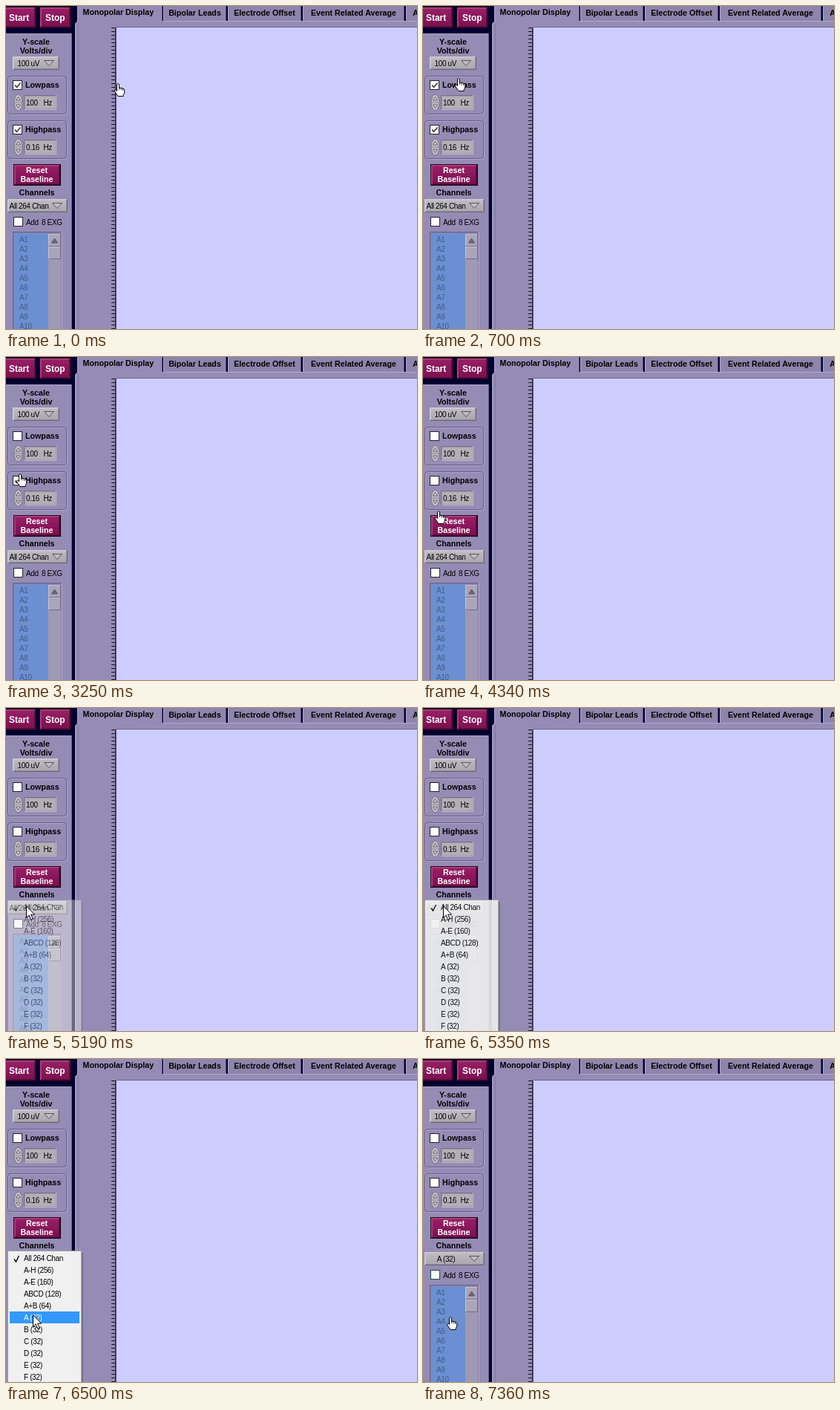
Write an HTML page that moves like this. It is 554 px wide and 435 px high and loops after 8520 ms.

```html
<!DOCTYPE html>
<html lang="en">
<head>
<meta charset="utf-8">
<title>Channel display settings</title>
<style>
  html, body { margin: 0; width: 100%; height: 100%; overflow: hidden; background: #000030; }
  svg { display: block; width: 554px; height: 435px; font: 10px "Liberation Sans", Arial, sans-serif; letter-spacing: -.37px; fill: #000; }
  .b { font-weight: bold; font-size: 10.7px; letter-spacing: 0; }
  .big { font-size: 11.9px; }
  .w { fill: #fff; }
  .m { text-anchor: middle; }
  .line { fill: none; }
</style>
</head>
<body>
<svg id="stage" viewBox="0 0 554 435" xmlns="http://www.w3.org/2000/svg"></svg>
<script>
const LOOP = 8520;
const PANEL = '#958cb5', LIGHT = '#b0a9cc', DARK = '#655d86';

const rect = (x, y, w, h, fill, more = '') =>
  `<rect x="${x}" y="${y}" width="${w}" height="${h}" fill="${fill}" ${more}/>`;
const path = (d, stroke, fill = 'none', more = '') =>
  `<path d="${d}" stroke="${stroke}" fill="${fill}" ${more}/>`;
const text = (x, y, s, cls = '', more = '') =>
  `<text x="${x}" y="${y}" class="${cls}" ${more}>${s}</text>`;
const bevel = (x, y, w, h, fill, hi, lo) => rect(x, y, w, h, fill) +
  path(`M${x + .5} ${y + h}V${y + .5}H${x + w}`, hi) +
  path(`M${x + .5} ${y + h - .5}H${x + w - .5}V${y}`, lo);

const button = (x, y, w, h) =>
  rect(x, y, w, h, '#1c0618') +
  bevel(x + 1, y + 1, w - 2, h - 2, '#8a1858', '#b5447f', '#4a0832') +
  bevel(x + 2, y + 2, w - 4, h - 4, 'url(#wine)', '#a8336f', '#5c0d40');

const dropdown = (x, y, w) =>
  bevel(x, y, w, 18, '#b5b3b9', '#cfcdd3', '#6b6777') +
  bevel(x + 1, y + 1, w - 2, 16, 'url(#steel)', '#c6c4ca', '#918d9a') +
  path(`M${x + w - 20.5} ${y + 5.5}h13l-6.5 7z`, '#55525c', '#c0bec4');

const group = y =>
  `<rect x="3.5" y="${y + 1.5}" width="79" height="51" rx="4" class="line" stroke="${LIGHT}"/>` +
  `<rect x="2.5" y="${y + .5}" width="79" height="51" rx="4" class="line" stroke="${DARK}"/>`;

const spinner = (y, value) =>
  `<ellipse cx="16.5" cy="${y}" rx="5.5" ry="11" fill="#c2bfc7" stroke="#77727f"/>` +
  path(`M11.5 ${y}h10`, '#85808e') +
  path(`M13.5 ${y - 3}l3-4.5 3 4.5z M13.5 ${y + 3}l3 4.5 3-4.5z`, '#444', '#d6d4da', 'stroke-width=".8"') +
  bevel(24, y - 10, 44, 20, '#a19daa', '#746d8a', '#bdb8cd') +
  rect(26, y - 8, 40, 16, '#b2b0b5') +
  text(27, y + 4, value) + text(50.5, y + 4, 'Hz');

const checkbox = (id, x, y) =>
  rect(x + .5, y + .5, 12, 12, '#fff', `id="${id}" stroke="#24222c"`) +
  path(`M${x + 3} ${y + 6.5}l2.5 3 5-6`, '#222', 'none', `id="${id}Tick" stroke-width="1.3"`);

const tab = (x, w, label) =>
  rect(x, 0, w, 20, '#8d85ab') +
  path(`M${x + .5} 19V0`, LIGHT) + path(`M${x + w - .5} 0V19`, '#4f4870') +
  text(x + w / 2, 13, label, 'b m');

function sidebar() {
  return rect(0, 0, 89, 37, '#000030') +
    button(-6, 1, 47, 29) + button(45, 1, 43, 29) +
    text(4, 20, 'Start', 'b w big') + text(53, 20, 'Stop', 'b w big') +
    bevel(-2, 37, 91, 400, PANEL, LIGHT, DARK) +
    text(40.5, 52, 'Y-scale', 'b m') + text(40.5, 64, 'Volts/div', 'b m') +
    dropdown(9, 68, 63) + text(15.5, 81, '100 uV') +
    group(94) + checkbox('low', 9, 100) + text(26, 110, 'Lowpass', 'b') + spinner(130, '100') +
    group(154) + checkbox('high', 9, 160) + text(26, 170, 'Highpass', 'b') + spinner(190, '0.16') +
    button(10, 213, 64, 29) +
    text(41.5, 225, 'Reset', 'b w m') + text(41.5, 237, 'Baseline', 'b w m') +
    text(41.5, 255, 'Channels', 'b m') +
    dropdown(2, 260, 81) + text(31, 273, '', 'm', 'id="choice"') +
    checkbox('add', 10, 284) + text(27, 295, 'Add') + text(48, 295, '8 EXG') +
    channelList();
}

function channelList() {
  let s = bevel(9, 304, 67, 140, '#8a82a8', DARK, LIGHT) + rect(11, 306, 46, 129, '#6b8fd2');
  for (let i = 0; i < 10; i++) s += text(18, 318 + 13 * i, 'A' + (i + 1), '', 'fill="#465a88"');
  return s + rect(57, 307, 17, 128, '#9f99b3') +
    bevel(57, 307, 17, 17, '#aaa5b8', '#c9c5d4', '#716b86') +
    path('M61.5 319l4-6 4 6z', '#5c5768', '#6c6779') +
    bevel(57, 324, 17, 17, '#aaa5b8', '#c9c5d4', '#716b86');
}

function display() {
  let ticks = '';
  for (let y = 29.5; y < 435; y += 5) ticks += `M142 ${y}h5`;
  return rect(89, 0, 465, 435, '#000030') +
    path('M93 435V24l3-3V0H211V20H554V435z', 'none', PANEL) +
    path('M93.5 435V24l3-3V0', LIGHT) + path('M97.5 435V23', '#8279a2') +
    path('M210.5 0V20', '#4f4870') + path('M211 20.5H554', LIGHT) +
    text(103.5, 11.5, 'Monopolar Display', 'b') +
    tab(212, 85, 'Bipolar Leads') + tab(299, 99, 'Electrode Offset') +
    tab(400, 137, 'Event Related Average') + tab(539, 26, 'A') +
    rect(149, 29, 405, 406, '#ccccff') +
    path('M148.5 435V28.5H554', '#6d6590') + path('M147.5 435V29', '#24202f') + path(ticks, '#15131c');
}

const items = ['All 264 Chan', 'A-H (256)', 'A-E (160)', 'ABCD (128)', 'A+B (64)',
  ...[...'ABCDEF'].map(c => c + ' (32)')];

const menu = () => '<g id="menu">' +
  rect(5, 261, 99, 180, '#000', 'opacity=".2"') +
  rect(2.5, 258.5, 99, 180, '#f0f0f0', 'stroke="#a2a2a2"') +
  rect(5, 292, 94, 16, '#3399ff', 'id="mark"') +
  path('M11 269.5l2.5 3.5 4-8', '#111', 'none', 'stroke-width="1.5"') +
  items.map((s, i) => text(24, 271.5 + 16 * i, s, 'item')).join('') + '</g>';

const hand = '<g id="hand" stroke="#000" fill="#fff" stroke-linejoin="round">' +
  '<path d="M-1.5 1.5q1.5-2 3 0v4.5l5.5 1.2q1.7.5 1.7 2.3v3.5l-1.5 2.5v2h-7.2l-4.4-6.5q-.8-2 1-2l1.9 1.6z"/>' +
  '<path class="line" d="M1.5 5.5v3.5M4 7v2.5M6.5 7.5v2.5" stroke-width=".8"/></g>';
const arrow = '<path id="arrow" stroke="#000" fill="#fff" d="M.5.8V16.5l3.6-3.4 2.8 6.2 2.4-1.1-2.7-6h5z"/>';

const stage = document.getElementById('stage');
stage.innerHTML = `<defs>
  <linearGradient id="wine" x2="0" y2="1"><stop stop-color="#981f66"/><stop offset="1" stop-color="#7c1050"/></linearGradient>
  <linearGradient id="steel" x2="0" y2="1"><stop stop-color="#bebcc2"/><stop offset="1" stop-color="#a9a7ae"/></linearGradient>
  </defs>` + display() + sidebar() + menu() + hand + arrow;

const $ = id => document.getElementById(id);
const show = (el, on) => el.setAttribute('visibility', on ? 'visible' : 'hidden');
const rows = [...stage.querySelectorAll('.item')];

// Pointer legs: start, end, steps, target x, target y, easing power, arc height
const legs = [
  [80, 1390, 18, 13, 104, 2, 10],
  [2560, 3410, 12, 20, 163, 1.3, 0],
  [3480, 3560, 2, 18, 168, 1, 0],
  [4110, 4870, 11, 25, 263, 1.15, 0],
  [5190, 5190, 1, 27, 266, 1, 0],
  [5730, 6580, 12, 36, 347, 1.3, 0],
  [7360, 7360, 1, 37, 347, 1, 0]
];

function stepped(t, start, end, n) {
  if (t < start) return 0;
  if (t >= end) return 1;
  return (Math.floor((t - start) / (end - start) * (n - 1) + .3) + 1) / n;
}

function pointer(t) {
  let x = 151, y = 104;
  for (const [start, end, n, tx, ty, pow, arc] of legs) {
    if (t < start) break;
    const p = 1 - (1 - stepped(t, start, end, n)) ** pow;
    x += (tx - x) * p;
    y += (ty - y) * p - arc * Math.sin(Math.PI * p);
  }
  return [Math.round(x), Math.round(y)];
}

function draw(t) {
  const [x, y] = pointer(t);
  const open = t >= 5190 && t < 7360;
  const over = top => !open && x >= 9 && x < 22 && y >= top && y < top + 13;

  show($('lowTick'), t < 2240);
  show($('highTick'), t < 3710);
  show($('addTick'), false);
  $('low').setAttribute('stroke', over(100) ? '#3a9ae0' : '#24222c');
  $('high').setAttribute('stroke', over(160) ? '#3a9ae0' : '#24222c');
  $('add').setAttribute('stroke', t >= 7360 ? '#1f4a46' : '#24222c');
  $('choice').textContent = items[t < 7360 ? 0 : 5];

  show($('menu'), open);
  $('menu').setAttribute('opacity', 1 - (1 - stepped(t, 5190, 5500, 5)) ** 2.5);
  const row = t >= 5730 ? Math.floor((y - 260) / 16) : -1;
  $('mark').setAttribute('y', 260 + 16 * row);
  $('mark').setAttribute('opacity', row < 0 ? 0 : 1);
  rows.forEach((el, i) => el.setAttribute('fill', i === row ? '#fff' : '#000'));

  const place = `translate(${x} ${y})`;
  $('hand').setAttribute('transform', place);
  $('arrow').setAttribute('transform', place);
  show($('hand'), !open);
  show($('arrow'), open);
}

const began = performance.now();
function tick() {
  draw((performance.now() - began) % LOOP);
  requestAnimationFrame(tick);
}
tick();
</script>
</body>
</html>
```
